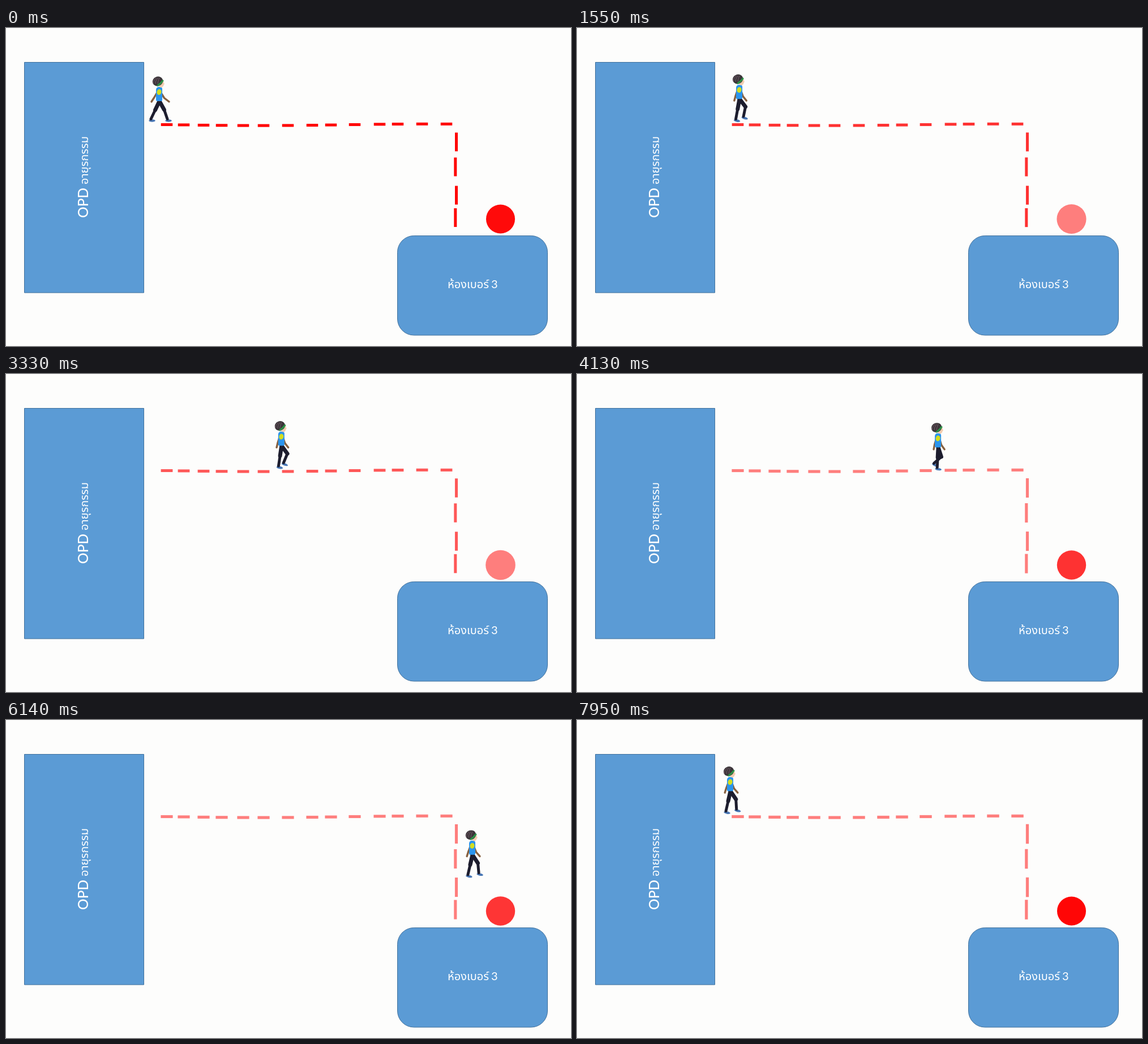
An HTML page with a canvas for the animation above (7.99 s loop, 998 by 561 pixels).

```html
<!DOCTYPE html>
<html lang="th">
<head>
<meta charset="utf-8">
<title>OPD</title>
<style>
  html, body { margin: 0; width: 100%; height: 100%; overflow: hidden; background: #fdfdfc; }
  canvas { display: block; }
</style>
</head>
<body>
<canvas id="stage" width="998" height="561"></canvas>
<script>
const ctx = document.getElementById('stage').getContext('2d');
const LOOP = 7990, STEP = 908, RESET = 7700;
const FONT = 'Lato, "Noto Sans Thai Looped", "Noto Sans Thai", "Noto Sans", sans-serif';
const SKIN = '#86603f', FACE = '#f2cdb0', TROUSERS = '#1d1d2e';

// Uneven, hand-placed spacing of the dashed route
const ACROSS = [284, 314, 349, 381, 419, 455, 498, 541, 574, 616, 660, 692, 735, 778];
const DOWN = [201, 245, 295, 334.5];

const clamp = u => Math.max(0, Math.min(1, u));
const progress = (t, start, duration) => clamp((t - start) / duration);
const smooth = u => u * u * (3 - 2 * u);
const easeOut = u => 1 - (1 - u) ** 2;

function pulse(phase) {
  const p = phase % 1;
  return {
    alpha: 1 - 0.5 * Math.min(1, p / 0.2, (1 - p) / 0.2),
    scale: 1 + 0.05 * (1 - Math.abs(2 * p - 1))
  };
}

function line(points, color, width) {
  ctx.beginPath();
  points.forEach(p => ctx.lineTo(...p));
  ctx.strokeStyle = color;
  ctx.lineWidth = width;
  ctx.stroke();
}

function ellipse(x, y, rx, ry, color, turn = 0) {
  ctx.beginPath();
  ctx.ellipse(x, y, rx, ry, turn, 0, 2 * Math.PI);
  ctx.fillStyle = color;
  ctx.fill();
}

function bar(x, y, w, h) {
  ctx.fillRect(x - w / 2, y - h / 2, w, h);
}

function text(str, x, y, size, weight) {
  ctx.font = `${weight} ${size}px ${FONT}`;
  ctx.fillStyle = '#fff';
  ctx.fillText(str, x, y);
}

function panel(x, y, w, h, radius) {
  ctx.beginPath();
  ctx.roundRect(x, y, w, h, radius);
  ctx.fillStyle = '#5b9bd5';
  ctx.fill();
  ctx.strokeStyle = '#41719c';
  ctx.lineWidth = 1;
  ctx.stroke();
}

function rooms() {
  panel(32.5, 60.5, 211, 406.5, 0);
  panel(691.5, 366.5, 265, 175.5, 29);
  ctx.save();
  ctx.translate(145, 334);
  ctx.rotate(-Math.PI / 2);
  text('OPD', -1, 0, 24.5, 500);
  text('อายุรกรรม', 58, 0, 20, 300);
  ctx.restore();
  text('ห้องเบอร์', 780, 459, 20, 300);
  text('3', 857, 459, 20, 400);
}

function markers(t) {
  const dash = pulse(Math.max(0, t - 470) / 1000);
  const long = dash.scale, thick = 5 * dash.scale;
  ctx.fillStyle = '#f00';
  ctx.globalAlpha = dash.alpha;
  for (const x of ACROSS) bar(x, 170.7 + 1.4 * Math.sin((x - 300) / 95), 20.5 * long, thick);
  DOWN.forEach((y, i) => bar(i % 2 ? 793.8 : 795.5, y, thick, 33 * long));

  const dot = pulse((t + 30) / 2000);
  ctx.globalAlpha = dot.alpha;
  ellipse(873.5, 337, 25.5 * dot.scale, 25.5 * dot.scale, '#f00');
  ctx.globalAlpha = 1;
}

// Two equal bones from hip to ankle, knee bending forwards
function leg(hipX, hipY, footX, footY, tilt) {
  const ankleX = footX - 2, ankleY = footY - 3;
  const dx = ankleX - hipX, dy = ankleY - hipY, len = Math.hypot(dx, dy);
  const bend = Math.sqrt(Math.max(0, 17.3 ** 2 - len * len / 4));
  const knee = [hipX + dx / 2 + bend * dy / len, hipY + dy / 2 - bend * dx / len];
  ellipse(footX, footY, 5.8, 2.2, '#4977b5', tilt);
  line([[hipX, hipY], knee], TROUSERS, 7);
  line([knee, [ankleX, ankleY]], TROUSERS, 5);
}

function arm(x, y, handX, handY) {
  line([[x, y], [(x + handX) / 2 - 1, (y + handY) / 2 + 2], [handX, handY]], SKIN, 3.4);
}

function head(y) {
  ellipse(274, y + 4, 5, 7, FACE);
  ellipse(278.5, y + 4.5, 1.3, 1.2, FACE);
  ellipse(268, y, 9.3, 8.3, '#3b3639', -0.35);
  for (const shift of [-4, 0, 4]) {
    line([[264 + shift, y + 4], [265 + shift, y - 1], [268 + shift * 0.7, y - 6]], '#75586a', 1);
  }
  line([[277, y - 1], [273.5, y + 3], [268, y + 7.5]], '#2b9347', 3);
}

// Speeds up along the corridor, then slows down towards the room
function position(t) {
  if (t > RESET) return [0, 0];
  const across = progress(t, 1000, 3930) ** 1.8;
  const down = easeOut(progress(t, 4560, 3040));
  return [553 * across, 10 * across ** 2 + 133 * down];
}

function walker(t) {
  const h = (t / STEP) % 1;
  const standX = 287 - 29 * h;
  const swingX = 258 + 29 * smooth(progress(h, 0.4, 0.45));
  const lift = 8 * Math.sin(Math.PI * progress(h, 0, 0.88));
  const rise = 4 * Math.sin(Math.PI * h ** 1.5);
  const reach = 15 - 6 * Math.sin(Math.PI * h);
  const hipY = 129 - rise, shoulderY = 112 - rise, handY = 130 - rise + (15 - reach) * 0.4;

  ctx.save();
  ctx.translate(...position(t));
  ctx.lineCap = ctx.lineJoin = 'round';
  arm(268, shoulderY, 272 - reach, handY);
  arm(273, shoulderY + 1, 273 + reach, handY);
  leg(271, hipY, swingX, 163.5 - lift, lift * 0.06);
  leg(271, hipY, standX, 163.5, 0.25 * h);
  ctx.beginPath();
  ctx.roundRect(265, 104 - rise, 11, 25, [5, 4, 2, 2]);
  ctx.fillStyle = '#2b95ee';
  ctx.fill();
  ellipse(270.5, 113 - rise, 4, 5, '#d3dd1f', 0.2);
  head(94 - rise);
  ctx.restore();
}

function draw(t) {
  ctx.fillStyle = '#fdfdfc';
  ctx.fillRect(0, 0, 998, 561);
  rooms();
  markers(t);
  walker(t);
}

let start;
function tick(now) {
  start ??= now;
  draw((now - start) % LOOP);
  requestAnimationFrame(tick);
}
requestAnimationFrame(tick);
</script>
</body>
</html>
```
